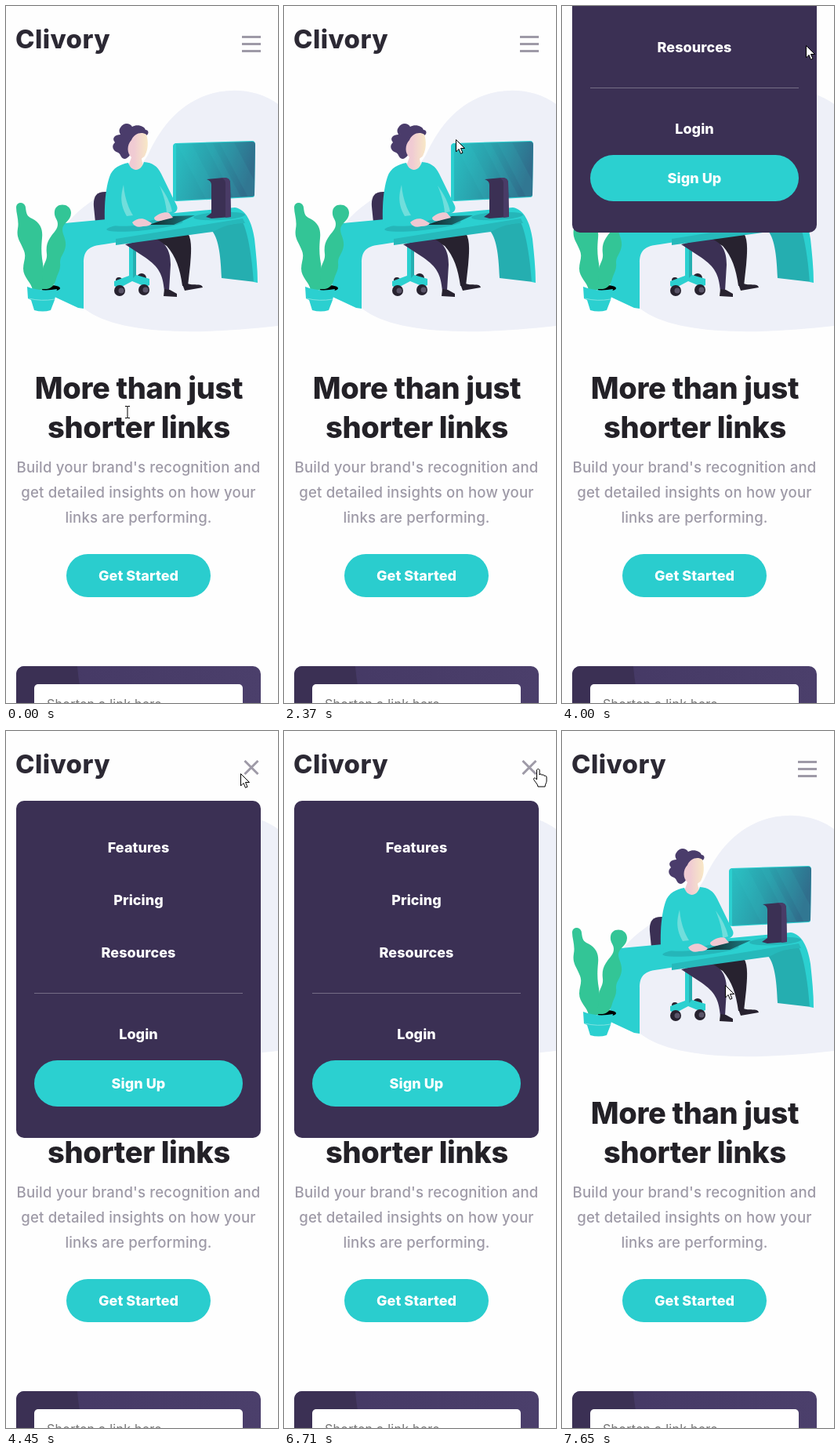
An HTML page that plays this animation: 347x889 px, repeating every 8000 ms.

```html
<!DOCTYPE html>
<html lang="en">
<head>
<meta charset="utf-8">
<title>Link shortener, mobile menu</title>
<style>
html, body { margin: 0; width: 100%; height: 100%; overflow: hidden; background: #fefefe; }
svg { display: block; width: 100%; height: 100%; cursor: default; }
text { font-family: Inter, "Open Sans", sans-serif; text-anchor: middle; }
.logo { font-size: 33px; font-weight: 800; letter-spacing: .4px; text-anchor: start; fill: #2c2934; }
.title { font-size: 38px; font-weight: 800; letter-spacing: -.35px; fill: #232127; }
.copy { font-size: 18.6px; font-weight: 500; letter-spacing: .16px; fill: #9e9aa7; }
.bold { font-size: 18px; font-weight: 800; letter-spacing: .05px; fill: #fff; }
.hint { font-size: 16px; letter-spacing: .27px; text-anchor: start; fill: #757575; }
.link.on { fill: #bfb9c0; }
.teal { fill: #2bd0d0; }
.deep { fill: #25aeb0; }
.plum { fill: #3b3054; }
.ink { fill: #27222f; }
.skin { fill: #f0c8d2; }
.leaf { fill: #33c596; }
.icon { fill: none; stroke: #9e9aa7; stroke-width: 3; }
</style>
</head>
<body>
<svg viewBox="0 0 347 889">
  <defs>
    <linearGradient id="screen" x2="1" y2=".25">
      <stop offset="0" stop-color="#29c3c5"/>
      <stop offset=".5" stop-color="#2a9fab"/>
      <stop offset="1" stop-color="#306e8c"/>
    </linearGradient>
    <linearGradient id="face">
      <stop offset=".3" stop-color="#f0cbd3"/>
      <stop offset="1" stop-color="#f8e8c6"/>
    </linearGradient>
    <linearGradient id="keys">
      <stop offset="0" stop-color="#11262b"/>
      <stop offset="1" stop-color="#1d8288"/>
    </linearGradient>
    <linearGradient id="card">
      <stop offset="0" stop-color="#443864"/>
      <stop offset="1" stop-color="#4b3f6b"/>
    </linearGradient>
    <clipPath id="glass"><path d="M217 176L314 173Q318 173 318 177L317 240Q317 243 314 243L217 248Z"/></clipPath>
    <clipPath id="cardBox"><rect x="13" y="842" width="312" height="90" rx="10"/></clipPath>
  </defs>

  <!-- backdrop -->
  <path fill="#eef0f8" d="M347 125C322 106 285 103 255 114C217 128 196 158 181 190C163 224 100 245 78 278C60 310 72 368 104 389C148 419 245 420 347 408Z"/>

  <!-- chair -->
  <path class="plum" d="M129 237C115 236 111 243 112 256L114 276H132Z"/>
  <circle class="ink" cx="173" cy="347" r="6"/>
  <circle class="ink" cx="144" cy="350" r="4"/>
  <path class="teal" d="M157 300H166V343L183 348V356L178 358L161 351L144 360L138 357V351L157 344Z"/>
  <path class="deep" d="M162 300H166V343L162 347Z"/>
  <circle class="ink" cx="145" cy="363" r="7"/>
  <circle class="ink" cx="176" cy="362" r="7"/>
  <circle cx="147" cy="363" r="3.5" fill="#5a5468"/>
  <circle cx="178" cy="362" r="3.5" fill="#5a5468"/>

  <!-- legs -->
  <path class="ink" d="M188 297L232 290C238 299 236 318 235 330L232 357H225C222 335 217 320 205 306ZM225 355L232 354C237 357 250 353 251 359L228 363Z"/>
  <path class="plum" d="M152 304L188 296C204 301 210 312 210 330L208 363H202C200 342 195 333 178 321Z"/>
  <path class="ink" d="M202 361L209 362L218 367V371L201 370Z"/>

  <!-- desk -->
  <path class="deep" d="M263 287L301 265C309 282 315 315 318 352L275 347C274 322 272 298 263 287Z"/>
  <path class="teal" d="M75 277L292 257C306 259 314 276 317 297C319 316 321 335 321 353L316 352C314 323 309 290 302 276L125 304C105 306 99 312 99 328V386L92 385L62 371C60 335 60 286 75 277Z"/>
  <path fill="#26b9bb" d="M140 297L302 271L305 277Q284 276 264 288L140 305Z"/>
  <ellipse fill="#25b6b9" cx="177" cy="280" rx="49" ry="6" transform="rotate(-6 177 280)"/>
  <ellipse fill="#25b6b9" cx="272" cy="268" rx="33" ry="5" transform="rotate(-3 272 268)"/>

  <!-- monitor -->
  <path class="teal" d="M216 175L314 172Q318 172 318 177L317 241Q317 244 314 244L218 249Q213 249 213 246V179Q213 176 216 175Z"/>
  <g clip-path="url(#glass)">
    <rect x="213" y="170" width="106" height="80" fill="url(#screen)"/>
    <path fill="#3ed0d0" opacity=".09" d="M215 170H234L276 250H257ZM251 170H261L303 250H293ZM270 170H289L331 250H312Z"/>
  </g>
  <path class="plum" d="M256 221L278 219Q286 219 286 226L287 269L262 271L255 269L262 264V228Q262 223 256 221Z"/>
  <path fill="#493b66" d="M279 219Q286 219 286 226L287 269L280 270V226Q280 221 274 219Z"/>

  <!-- person -->
  <path fill="#4a3c6b" d="M146 155C150 148 158 149 161 154C167 150 177 153 178 158C182 158 183 163 179 165L166 170C159 178 163 191 152 195C146 195 147 189 143 187C136 185 134 178 139 174C134 168 140 164 146 164C144 160 144 158 146 155Z"/>
  <path fill="url(#face)" d="M160 171C164 162 173 160 179 164C182 172 181 184 178 189C177 193 174 193 173 195L175 205Q166 215 156 204L160 193C154 188 154 177 160 171Z"/>
  <path class="teal" d="M156 200C160 212 172 212 176 199C187 200 193 204 198 214L218 255C220 261 216 265 207 266L166 280C153 281 133 282 126 276C125 250 128 230 132 218C136 206 146 202 156 200Z"/>
  <path fill="#70dedc" d="M150 228C145 245 147 256 154 268L162 267C155 256 151 242 150 228ZM196 229C204 240 209 249 212 262L205 264C204 250 200 239 196 229Z"/>
  <path fill="url(#keys)" d="M183 279L214 268L241 267L214 279Z"/>
  <path class="skin" d="M161 276C166 271 174 270 179 273L186 277Q184 281 175 281Q165 284 161 276ZM189 270C194 265 203 262 208 264L213 270L197 274Q189 275 189 270Z"/>

  <!-- plant -->
  <ellipse cx="56" cy="360" rx="13" ry="4"/>
  <path class="leaf" d="M13 257C13 249 24 249 25 257C26 266 27 268 33 271C45 277 47 286 46 296C45 306 45 314 46 322C48 335 50 345 46 362H34C32 352 22 346 22 335C22 325 27 320 22 310C18 300 13 296 15 284C17 274 13 265 13 257Z"/>
  <path class="leaf" d="M62 262C63 250 83 251 83 264C83 274 72 277 72 285C72 292 77 297 76 306C75 315 69 319 69 327C70 337 66 341 64 348C62 356 58 360 52 361H45C46 350 47 345 47 338C47 329 53 325 52 316C51 308 52 302 56 296C61 288 66 285 66 278C66 272 61 270 62 262Z"/>
  <path class="teal" d="M27 358Q45 365 65 361L62 375L57 388Q47 391 36 388L32 375L28 373Z"/>
  <path fill="none" stroke="#7fe2e0" d="M29 373Q45 377 62 374"/>

  <!-- page -->
  <text class="logo" x="12" y="54">Clivory</text>
  <path id="bars" class="icon" d="M301 39.5H325M301 48.5H325M301 57.5H325"/>
  <path id="cross" class="icon" d="M304.500 38L321.500 55M321.500 38L304.500 55"/>
  <text class="title" x="169.500" y="501">More than just</text>
  <text class="title" x="169.500" y="551">shorter links</text>
  <text class="copy" x="169" y="595">Build your brand's recognition and</text>
  <text class="copy" x="169" y="627">get detailed insights on how your</text>
  <text class="copy" x="169" y="659">links are performing.</text>
  <rect fill="#2acdce" x="77" y="699" width="184" height="55" rx="27.5"/>
  <text class="bold" x="169" y="733">Get Started</text>
  <g clip-path="url(#cardBox)">
    <rect x="13" y="842" width="312" height="90" fill="url(#card)"/>
    <path class="plum" d="M13 842H91Q93 868 99 889H13Z"/>
  </g>
  <rect x="36" y="865" width="266" height="50" rx="5" fill="#fff"/>
  <text class="hint" x="52" y="896">Shorten a link here...</text>

  <g id="menu">
    <rect class="plum" x="13" y="89" width="312" height="430" rx="10"/>
    <text class="bold link" x="169" y="155">Features</text>
    <text class="bold link" x="169" y="222">Pricing</text>
    <text class="bold link" x="169" y="289">Resources</text>
    <path stroke="#756d86" d="M36 334.5H302"/>
    <text class="bold" x="169" y="393">Login</text>
    <rect class="teal" x="36" y="420" width="266" height="59" rx="29.5"/>
    <text class="bold" x="169" y="456">Sign Up</text>
  </g>

  <!-- pointers, hotspot at 0,0 -->
  <g id="pointer">
    <path id="beam" fill="none" stroke="#000" d="M-3 -7.500H-1L0 -7L1 -7.500H3M0 -7V7M-3 7.500H-1L0 7L1 7.500H3"/>
    <path id="arrow" fill="#fff" stroke="#000" d="M.5 .5V16L4 12.500L6.500 18.300L9 17.200L6.500 11.500H11.500Z"/>
    <path id="hand" fill="#fff" stroke="#000" d="M-1.500 14V2C-1.500 0 2 0 2 2V8C2 6.500 5 6.500 5 8.500C5.500 7.300 8 7.500 8 9.500C8.500 8.500 11 9 11 11V16C11 18 9 20 9 23H0C0 20 -3 18 -5 14.500C-6.500 12 -4 10.500 -1.500 14Z"/>
  </g>
</svg>
<script>
const LOOP = 8000;
const el = id => document.getElementById(id);
const links = document.querySelectorAll('.link');

const linear = u => u;
const easeOut = u => 1 - (1 - u) ** 2;
const smooth = u => u * u * (3 - 2 * u);

// Each move: first and last step time, step count, easing, control point, end point
const start = [155.5, 518];
const moves = [
  [130, 270, 2, linear, [153.5, 510], [151.5, 502]],
  [1080, 2070, 8, smooth, [26, 385], [149, 274]],
  [2220, 3260, 8, easeOut, [230, 149.5], [311, 51]],
  [3400, 3400, 1, linear, [311, 50], [311, 50]],
  [4450, 5480, 8, smooth, [180, 95], [180, 244]],
  [5630, 6560, 8, linear, [235, 411], [325.5, 51]],
  [6710, 6710, 1, linear, [324, 48], [324, 48]],
  [7230, 7650, 4, smooth, [285, 190], [208, 324]]
];

// Menu offset from its open place; null while closed
function menuOffset(t) {
  if (t < 4000 || t >= 7230) return null;
  if (t < 4140) return -230;
  return t < 7080 ? 0 : -151;
}

function pointerAt(t) {
  let from = start;
  for (const [t0, t1, steps, ease, ctrl, to] of moves) {
    if (t < t0) break;
    if (t >= t1) { from = to; continue; }
    const step = Math.floor((t - t0) / (t1 - t0) * (steps - 1)) + 1;
    const u = ease(step / steps), v = 1 - u;
    return from.map((p, i) => v * v * p + 2 * u * v * ctrl[i] + u * u * to[i]);
  }
  return from;
}

const show = (id, on) => el(id).setAttribute('visibility', on ? 'visible' : 'hidden');

function draw(t) {
  const [x, y] = pointerAt(t);
  const offset = menuOffset(t);
  const open = offset === 0;
  const moving = offset !== null && !open;

  const inMenu = open && x > 36 && x < 302;
  const hovered = inMenu ? Math.floor((y - 115) / 67) : -1;
  const onLink = hovered >= 0 && hovered < links.length;
  const onToggle = !moving && x > 301 && x <= 325 && y > 36 && y < 60;
  const hand = onLink || onToggle;
  const beam = !open && !moving && y > 462 && y < 562;

  links.forEach((link, i) => link.classList.toggle('on', i === hovered));
  show('menu', offset !== null);
  el('menu').setAttribute('transform', `translate(0 ${offset || 0})`);
  show('bars', !open);
  show('cross', open);
  el('pointer').setAttribute('transform', `translate(${Math.floor(x)} ${Math.floor(y)})`);
  show('hand', hand);
  show('beam', beam);
  show('arrow', !hand && !beam);
}

const begin = performance.now();
function tick() {
  draw((performance.now() - begin) % LOOP);
  requestAnimationFrame(tick);
}
tick();
</script>
</body>
</html>
```
